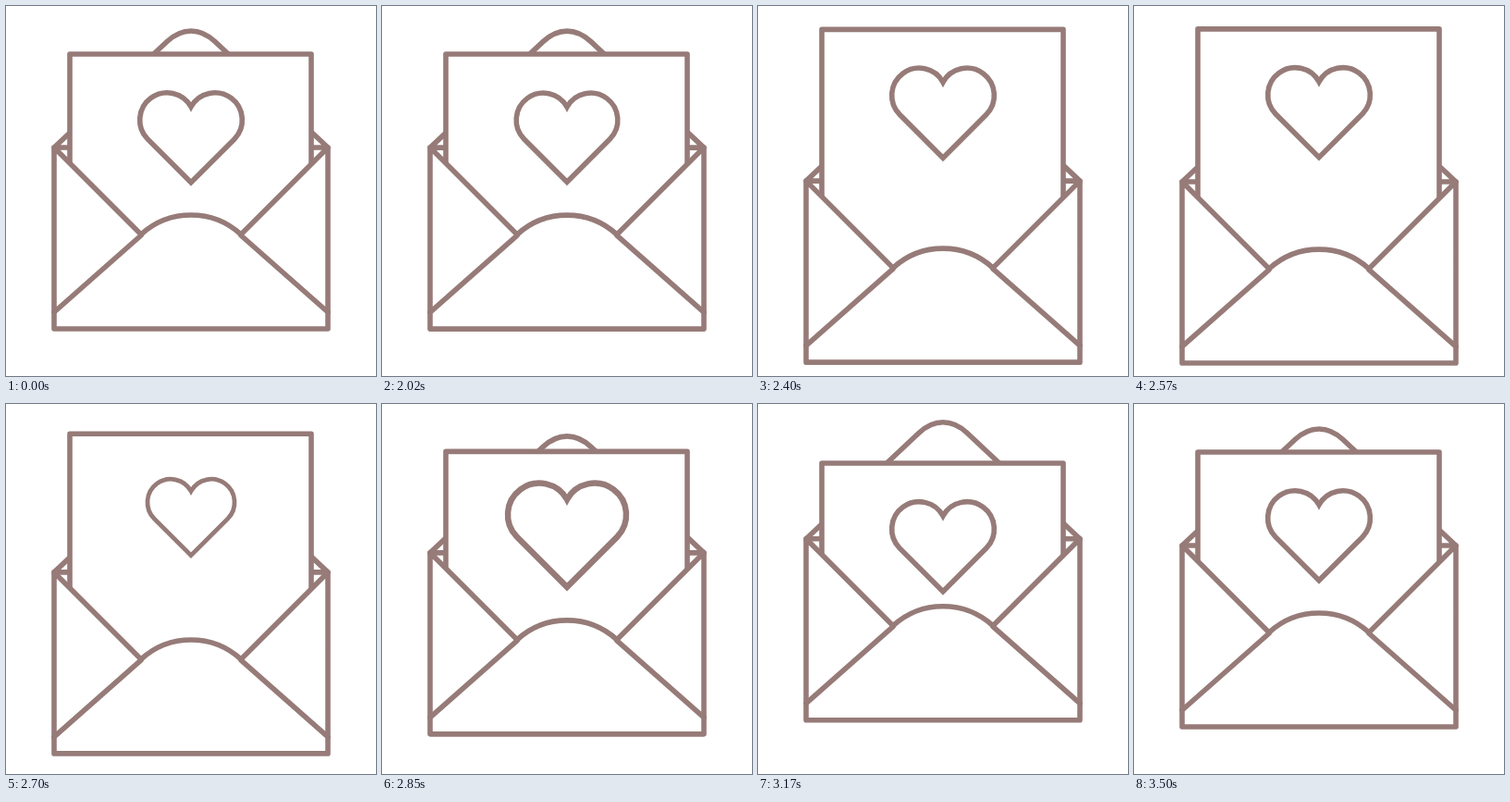
An HTML page that plays this animation: 400x400 px, repeating every 3520 ms.

```html
<!DOCTYPE html>
<html lang="en">
<head>
<meta charset="utf-8">
<title>Love letter</title>
<style>
  html, body { margin: 0; width: 100%; height: 100%; overflow: hidden; background: #fff; }
  svg { display: block; width: 100%; height: 100%; }
  path { fill: #fff; stroke: #967b78; stroke-width: 5.6; stroke-linecap: round; stroke-linejoin: round; }
  .line { fill: none; }
</style>
</head>
<body>
<svg viewBox="0 0 400 400">
  <g class="envelope">
    <path d="M52 153 L174 38.5 Q186.3 27 200 27 T226 38.5 L348 153 Z"/>
  </g>
  <g id="paper">
    <path d="M69 320 V52 H330 V320"/>
    <path id="heart" stroke-linejoin="miter" style="stroke-linejoin:miter"
      d="M200 109 A29.5 29.5 0 1 0 153.1 143.9 L200 190.8 L246.9 143.9 A29.5 29.5 0 1 0 200 109 Z"/>
  </g>
  <g class="envelope">
    <path d="M52 153 L146 247 A80 80 0 0 1 254 247 L348 153 V349 H52 Z"/>
    <path class="line" d="M52 331 L146 248 M254 248 L348 331"/>
  </g>
</svg>
<script>
const LOOP = 3520;
const envelopes = document.querySelectorAll('.envelope');
const paper = document.getElementById('paper');
const heart = document.getElementById('heart');

// Cubic Bezier easing with flat ends: control points (a, 0) and (b, 1).
function ease(x, a, b) {
  let lo = 0, hi = 1;
  for (let i = 0; i < 24; i++) {
    const s = (lo + hi) / 2, r = 1 - s;
    if (3 * a * s * r * r + 3 * b * s * s * r + s * s * s < x) lo = s; else hi = s;
  }
  return lo * lo * (3 - 2 * lo);
}

// Keys: [time, value, a, b], where a and b shape the move towards that key.
function track(keys, t) {
  if (t <= keys[0][0]) return keys[0][1];
  for (let i = 1; i < keys.length; i++) {
    const [t0, v0] = keys[i - 1], [t1, v1, a = 0.37, b = 0.63] = keys[i];
    if (t < t1) return v0 + (v1 - v0) * ease((t - t0) / (t1 - t0), a, b);
  }
  return keys[keys.length - 1][1];
}

const swing = (down, up) => [
  [2000, 0], [2500, down, 0.5, 0.43], [3070, up, 0.53, 0.58], [3500, 0, 0.3, 0.5]
];
const beat = start => [
  [start, 1], [start + 133, 0.85], [start + 267, 1.165], [start + 400, 1]
];
const envelopeKeys = swing(38, -9);
const paperKeys = swing(-28, 14.7);
const heartKeys = [...beat(2000), ...beat(2565)];

function draw(now) {
  const t = now % LOOP;
  const move = y => `translate(0 ${y})`;
  envelopes.forEach(el => el.setAttribute('transform', move(track(envelopeKeys, t))));
  paper.setAttribute('transform', move(track(paperKeys, t)));
  heart.setAttribute('transform',
    `translate(200 142) scale(${track(heartKeys, t)}) translate(-200 -142)`);
  requestAnimationFrame(draw);
}
const start = performance.now();
requestAnimationFrame(function first() { draw(Math.max(0, performance.now() - start)); });
</script>
</body>
</html>
```
